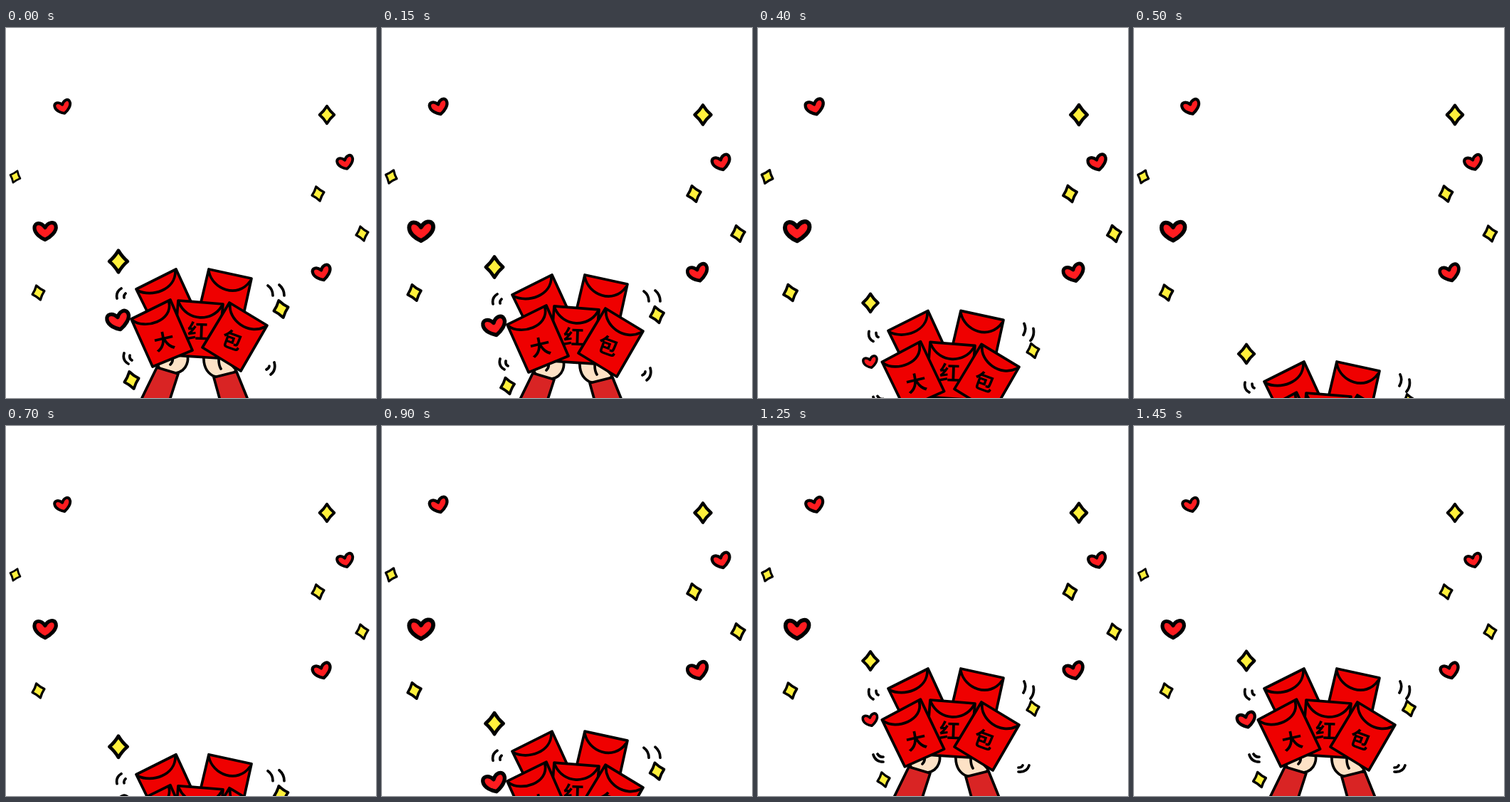
These frames come from a looping animation (520x520 px, 1.5 s). An HTML page:

```html
<!DOCTYPE html>
<html lang="zh">
<head>
<meta charset="utf-8">
<style>
html, body { margin: 0; width: 100%; height: 100%; overflow: hidden; background: #fff; }
svg { display: block; width: 100vw; height: 100vh; }
text { font: 700 29px "Noto Sans CJK SC", "Noto Sans CJK", sans-serif; text-anchor: middle; fill: #000; stroke: none; }
.ink { fill: none; stroke: #000; stroke-width: 3.7; stroke-linecap: round; stroke-linejoin: round; }
.paper { fill: #ef0000; }
.sleeve { fill: #d92424; }
.skin { fill: #fde2c6; }
.line { fill: none; }
</style>
</head>
<body>
<svg viewBox="0 0 520 520">
  <defs>
    <path id="heart" fill="#ff1c20" stroke="#000" stroke-width="5.2" stroke-linejoin="round"
      d="M0 12.5C-6 10-15 4-15-4C-15-12-6-13 0-4.5C4-12 13-14 15-7C17 1 7 9 0 12.5Z"/>
    <path id="star" fill="#fff03c" stroke="#000" stroke-width="4" stroke-linejoin="round"
      d="M0-12.5Q4.5-5 10.5 0Q4.5 5 0 12.5Q-4.5 5-10.5 0Q-4.5-5 0-12.5Z"/>
  </defs>
  <g id="sky"></g>
  <g id="bag">
    <g class="ink">
      <path class="skin" d="M213 470C214 488 238 489 248 481C256 474 257 464 254 456L215 462Z"/>
      <path class="skin" d="M278 460C277 474 282 484 291 489C303 494 322 489 323 480L300 455Z"/>
      <path class="line" d="M234 464Q235 469 231 473M299 466Q299 474 302 479"/>
      <path class="sleeve" d="M212 477L242 486L231 520L219 560H170L191 520Z"/>
      <path class="sleeve" d="M292 491L324 483L339 520L357 560H309L300 520Z"/>
      <path class="paper" d="M239 339L183 367L208 418L267 400Z"/>
      <path class="line" d="M185 369C205 379 238 368 238 342"/>
      <path class="paper" d="M285 339L345 352L334 402L272 394Z"/>
      <path class="line" d="M285 342C290 367 325 381 343 356"/>
      <path class="paper" d="M242 383L305 388L298 464L236 460Z"/>
      <path class="line" d="M243 386C255 413 290 413 303 391"/>
      <text transform="translate(269 437) rotate(2)">红</text>
    </g>
    <g id="hearts"></g>
    <g class="ink">
      <g id="front">
        <path class="paper" d="M176 409L231 382L262 453L206 476Z"/>
        <path class="line" d="M178 411C195 424 235 412 229 385"/>
      </g>
      <text transform="translate(225 451) rotate(-13)">大</text>
      <path class="paper" d="M314 386L367 418L330 482L276 449Z"/>
      <path class="line" d="M315 388C312 410 340 432 364 420"/>
      <text transform="translate(314 449) rotate(20)">包</text>
    </g>
    <g id="stars"></g>
    <path id="marks" class="ink"/>
  </g>
</svg>
<script>
const $ = id => document.getElementById(id);
const LOOP = 1500, STEP = 50, DROP = 130, REST = 2;

// Motion lines for the two poses
const marks = [
  "M162 366Q154 371 156 380M168 373Q165 376 166 379" +
  "M368 362Q375 367 375 376M384 361Q391 367 391 376" +
  "M166 457Q163 467 172 472M174 460Q173 465 177 467" +
  "M377 470Q380 481 372 487M370 475Q370 478 366 480",
  "M156 368Q154 378 162 382M166 370Q166 375 169 376" +
  "M374 357Q378 365 373 373M387 364Q389 374 383 381" +
  "M162 460Q165 470 176 470M168 459Q171 464 176 463" +
  "M381 475Q378 485 366 484M372 475Q371 478 366 478"
];

const sprites = [];
function add(parent, shape, rows) {
  for (const [x, y, size, tilt] of rows) {
    const el = document.createElementNS("http://www.w3.org/2000/svg", "use");
    el.setAttribute("href", "#" + shape);
    $(parent).append(el);
    sprites.push({ el, x, y, size, tilt, group: parent });
  }
}
add("sky", "heart", [[55, 285, 1, 0], [80, 111, .74, -15], [477, 189, .74, -15], [444, 344, .83, -15]]);
add("sky", "star", [[451, 122, .98, 0], [13, 209, .7, 20], [438.5, 233, .83, -15], [500.5, 289, .82, -14], [45.5, 372, .83, -16]]);
add("hearts", "heart", [[158, 411, 1.03, -13]]);
add("stars", "star", [[158, 328, 1.22, 0], [386.5, 395, .99, -15], [176.5, 495, .99, -15]]);

const wave = u => .5 - .5 * Math.cos(Math.PI * u);

// Slow start with a steep finish
const rush = (x, a) => a * x * x + (1 - a) * x ** 14;

function offset(t) {
  if (t <= 500) return DROP * rush(t / 500, .68);
  if (t <= 550) return DROP;
  if (t < 1050) return DROP - (DROP - REST) * rush((t - 550) / 500, .63);
  return REST;
}

// Quick growth, slower shrink, twice per loop
function swell(t) {
  const p = t % 750 / 750;
  return p < .33 ? wave(p / .33) : wave((1 - p) / .67);
}

function shrink(t) {
  if (t < 400) return wave(t / 400);
  if (t < 775) return wave((775 - t) / 375);
  return t < 1325 ? wave((t - 775) / 550) : wave((1700 - t) / 375);
}

function draw(t) {
  const q = shrink(t), bent = q > .6;
  const zoom = {
    sky: 1 + .18 * swell(t),
    stars: 1 - .16 * q,
    hearts: 1 - .37 * Math.max(0, 2 * q - 1)
  };
  for (const s of sprites)
    s.el.setAttribute("transform", `translate(${s.x} ${s.y}) rotate(${s.tilt}) scale(${s.size * zoom[s.group]})`);
  $("bag").setAttribute("transform", `translate(0 ${offset(t).toFixed(2)})`);
  $("front").setAttribute("transform", `rotate(${bent ? -1.8 : 0} 235 465)`);
  $("marks").setAttribute("d", marks[+bent]);
}

const start = performance.now();
function tick() {
  const t = (performance.now() - start) % LOOP;
  draw(Math.floor(t / STEP) * STEP);
  requestAnimationFrame(tick);
}
tick();
</script>
</body>
</html>
```
